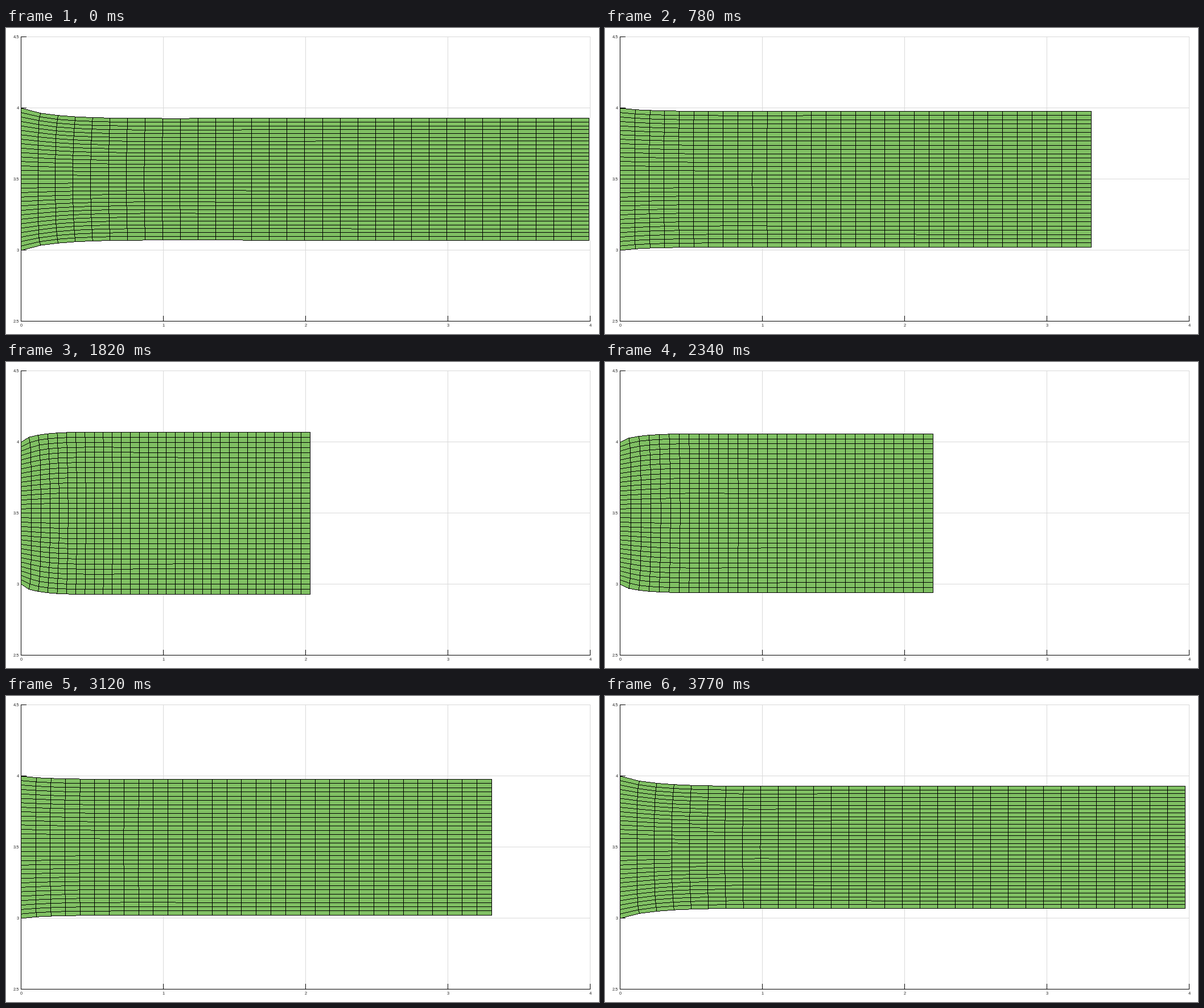
A matplotlib script for the animation above (3900 ms loop, 1042 by 538 pixels).

```python
import numpy as np
import matplotlib.pyplot as plt
from matplotlib.animation import FuncAnimation
from matplotlib.collections import LineCollection

W, H, DPI = 1042, 538, 64
PX = 72 / DPI                      # one pixel in points
FRAMES, INTERVAL = 30, 130
N = 32                             # cells per direction
LENGTH, HEIGHT, POISSON = 3.0, 1.0, 0.3
PEAK_STRAIN, LAG = 1 / 3, 0.01
SCALE, LEFT, MIDDLE = 250, 26.96, 265.95
AXIS, TEXT, GRID = "black", "#262626", "#d9d9d9"
GREEN, BLACK = (128, 192, 99, 255), (0, 0, 0, 255)


def element_stiffness(hx, hy):
    """Bilinear plane-strain element, scaled to unit axial modulus."""
    nu = POISSON
    factor = (1 - nu**2) / ((1 + nu) * (1 - 2 * nu))
    material = factor * np.array([[1 - nu, nu, 0],
                                  [nu, 1 - nu, 0],
                                  [0, 0, 0.5 - nu]])
    sx, sy = np.array([-1, 1, 1, -1]), np.array([-1, -1, 1, 1])
    gauss = 1 / np.sqrt(3)
    ke = np.zeros((8, 8))
    for a in (-gauss, gauss):
        for b in (-gauss, gauss):
            dx = sx * (1 + sy * b) / (2 * hx)
            dy = sy * (1 + sx * a) / (2 * hy)
            strain = np.zeros((3, 8))
            strain[0, 0::2] = strain[2, 1::2] = dx
            strain[1, 1::2] = strain[2, 0::2] = dy
            ke += strain.T @ material @ strain * hx * hy / 4
    return ke


def solve_bar():
    """Displacement of a bar clamped at the left and pulled at the right."""
    hx, hy = LENGTH / N, HEIGHT / N
    ids = np.arange((N + 1) ** 2).reshape(N + 1, N + 1)
    corners = np.stack([ids[:-1, :-1], ids[1:, :-1], ids[1:, 1:], ids[:-1, 1:]],
                       axis=-1).reshape(-1, 4)
    dofs = np.stack([2 * corners, 2 * corners + 1], axis=-1).reshape(-1, 8)
    stiffness = np.zeros((2 * ids.size, 2 * ids.size))
    np.add.at(stiffness, (dofs[:, :, None], dofs[:, None, :]),
              element_stiffness(hx, hy)[None])
    force = np.zeros(2 * ids.size)
    force[2 * ids[-1]] = PEAK_STRAIN * hy
    force[2 * ids[-1, [0, -1]]] /= 2
    free = slice(2 * (N + 1), None)
    shift = np.zeros_like(force)
    shift[free] = np.linalg.solve(stiffness[free, free], force[free])
    return shift.reshape(N + 1, N + 1, 2)


def trace(along, across):
    """Pixels of a hard-edged, one pixel wide line."""
    steps = np.arange(int(along[0]), int(along[-1]) + 1)
    return steps, np.interp(steps + 0.5, along, across).astype(int)


def paint(points):
    """Deformed mesh as a crisp transparent layer."""
    layer = np.zeros((H, W, 4), np.uint8)
    x, y = points[..., 0], points[..., 1]
    cols, top = trace(x[:, 0], y[:, 0])
    _, bottom = trace(x[:, -1], y[:, -1])
    rows = np.arange(H)[:, None]
    inside = (rows >= top) & (rows <= bottom)
    layer[:, cols[0]:cols[-1] + 1][inside] = GREEN
    for i in range(N + 1):
        cols, rows = trace(x[:, i], y[:, i])
        layer[rows, cols] = BLACK
        rows, cols = trace(y[i], x[i])
        layer[rows, cols] = BLACK
    return layer


rest = np.stack(np.meshgrid(np.linspace(0, LENGTH, N + 1),
                            np.linspace(-HEIGHT / 2, HEIGHT / 2, N + 1),
                            indexing="ij"), axis=-1)
stretch = solve_bar()

fig = plt.figure(figsize=(W / DPI, H / DPI), dpi=DPI, facecolor="white")
ax = fig.add_axes([0, 0, 1, 1])
body = ax.imshow(np.zeros((H, W, 4), np.uint8), extent=(0, W, H, 0),
                 aspect="auto", interpolation="nearest", zorder=3)
ax.set_xlim(0, W)
ax.set_ylim(H, 0)
ax.axis("off")


def add_lines(segments, color):
    ax.add_collection(LineCollection(segments, colors=color, linewidths=PX,
                                     antialiaseds=False, snap=False),
                      autolim=False)


def label(x, y, text, align):
    ax.text(x, y, text, ha=align, va="baseline", color=TEXT,
            family="Liberation Sans", fontsize=7.5 * PX)


xs = [26.5 + SCALE * i for i in range(5)]
ys = [15.5 + SCALE / 2 * i for i in range(5)]
x0, x1, y0, y1 = 26, 1027, 15, 516
add_lines([[(x, y0), (x, y1)] for x in xs[1:]]
          + [[(x0, y), (x1, y)] for y in ys[:-1]], GRID)
add_lines([[(x, y1 - 10), (x, y1)] for x in xs]
          + [[(x0, y), (x0 + 10, y)] for y in ys]
          + [[(xs[0], y0), (xs[0], y1)], [(x0, ys[-1]), (x1, ys[-1])]], AXIS)
for i in range(5):
    label(xs[i], 525.4, f"{i}", "center")
    label(23.3, ys[i] + 2.9, f"{4.5 - i / 2:g}", "right")


def update(frame):
    load = np.cos(2 * np.pi * (frame - LAG) / FRAMES)
    body.set_data(paint((rest + load * stretch) * SCALE + (LEFT, MIDDLE)))
    return (body,)


anim = FuncAnimation(fig, update, frames=FRAMES, interval=INTERVAL,
                     init_func=lambda: update(0), repeat=True, repeat_delay=0)
plt.show()
```
